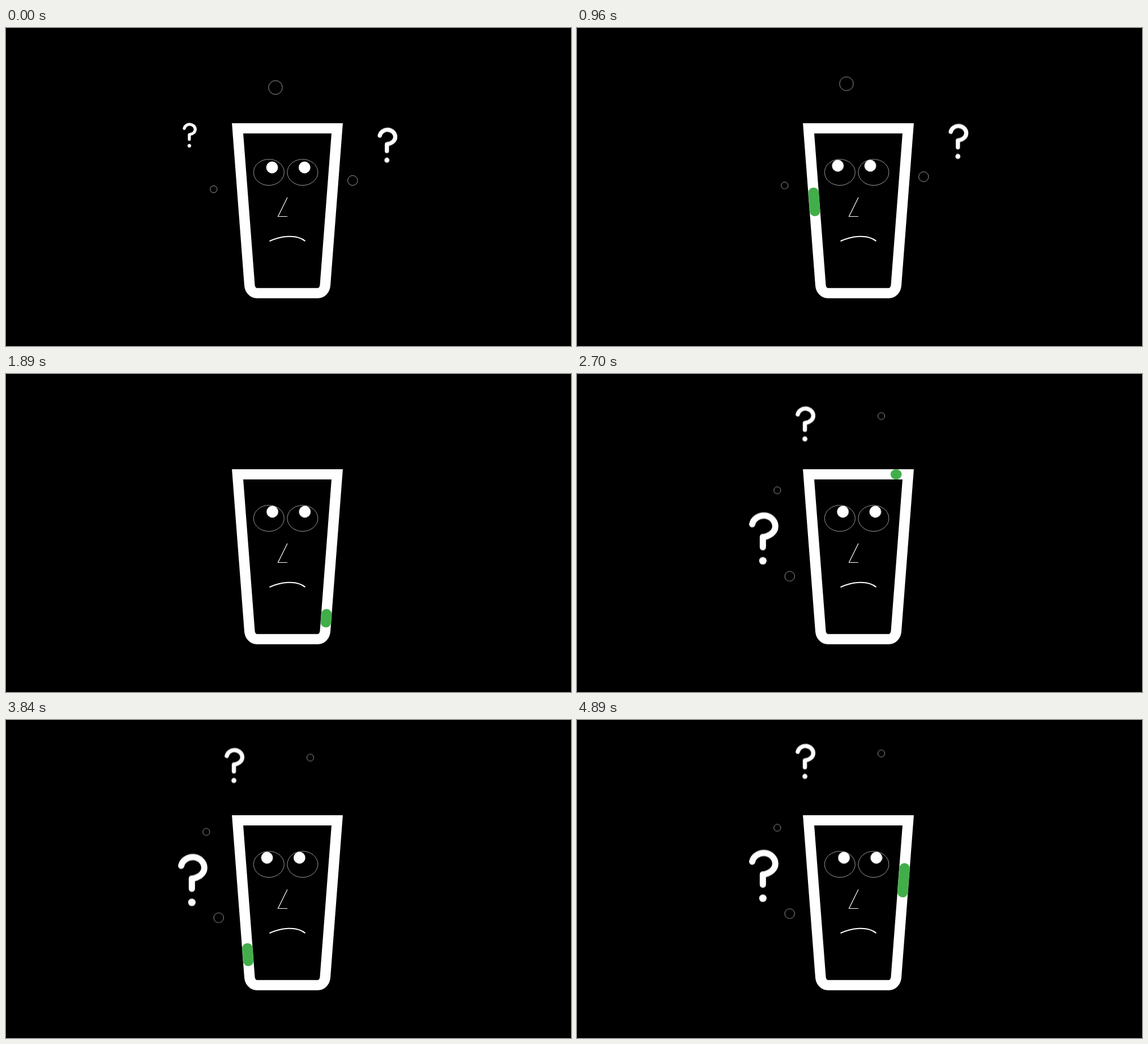
An HTML page for the animation above (4920 ms loop, 998 by 561 pixels).

```html
<!DOCTYPE html>
<html lang="en">
<head>
<meta charset="utf-8">
<title>Puzzled glass</title>
<style>
  html, body { margin: 0; width: 100%; height: 100%; overflow: hidden; background: #000; }
  svg { display: block; width: 100vw; height: 100vh; }
  svg * { animation: 4920ms linear infinite; }

  .line { fill: none; stroke: #fff; }
  .thin { stroke-width: .6; }
  .wall { fill: none; stroke-width: 18; }
  .solid { fill: #fff; }

  .pulse { stroke: #42ae49; stroke-linecap: round; stroke-linejoin: round; animation-name: pulse, wake; }
  .pupils { animation-name: look; }
  .rise { animation-name: rise; }
  .brief { animation-name: brief; }
  .early { animation-name: early; }
  .late { animation-name: late; }

  /* Head and tail run at slightly different speeds: the dash shrinks on lap one, grows on lap two. */
  @keyframes pulse {
    0% { stroke-dasharray: 0 2000; stroke-dashoffset: 0; }
    2.988% { stroke-dasharray: 55.7 2000; stroke-dashoffset: 0; }
    53.658% { stroke-dasharray: 0 2000; stroke-dashoffset: -1000; }
    53.659% { stroke-dasharray: 0 2000; stroke-dashoffset: 0; }
    100% { stroke-dasharray: 49.3 2000; stroke-dashoffset: -865; }
  }
  @keyframes wake {
    0% { opacity: 0; animation-timing-function: step-end; }
    0.6%, 100% { opacity: 1; }
  }
  @keyframes look {
    0% { transform: translate(0, 3px); }
    12.2% { transform: translate(-6.6px, 0); }
    14.63%, 68.29% { transform: translate(-8px, 0); }
    20.33%, 73.98% { transform: translate(-9.5px, 0); }
    24.39%, 78.05% { transform: translate(-9px, 0); }
    33.54%, 87.2% { transform: translate(-1.5px, 0); }
    38.41%, 92.07% { transform: translate(.5px, 0); }
    45.73%, 99.39%, 100% { transform: translate(1.5px, 0); }
    53.66% { transform: translate(.3px, 0); }
  }
  @keyframes rise { to { transform: translateY(-34px); } }
  @keyframes brief {
    0% { opacity: 1; animation-timing-function: step-end; }
    15.85%, 100% { opacity: 0; }
  }
  @keyframes early {
    0% { opacity: 1; animation-timing-function: step-end; }
    24.39%, 100% { opacity: 0; }
  }
  @keyframes late {
    0% { opacity: 0; animation-timing-function: step-end; }
    48.78%, 100% { opacity: 1; }
  }
</style>
</head>
<body>
<svg viewBox="0 0 998 561">
  <defs>
    <g id="question">
      <path d="M-18.8 20.5A20.6 19 0 0 1 22 24.3C22 34.5 12 41.5 0 43.3V61"
        class="line" stroke-width="11" stroke-linecap="round" stroke-linejoin="round"/>
      <circle cy="85" r="6.6" class="solid"/>
    </g>
  </defs>

  <!-- Both walls follow the centre line of the glass, drawn around its vertical axis -->
  <g transform="translate(497 0) scale(1.03 1)">
    <path class="wall" stroke="#fff" stroke-miterlimit="8" d="M85.4 177H-85.4L-64.8 454C-64.1 461.5 -59.2 467.7 -52.4 467.7
      H52.4C59.2 467.7 64.1 461.5 64.8 454Z"/>
    <path class="wall pulse" pathLength="1000" d="M85.4 177H-85.4L-64.8 454C-64.1 461.5 -59.2 467.7 -52.4 467.7
      H52.4C59.2 467.7 64.1 461.5 64.8 454L85.4 177"/>
  </g>

  <g class="line thin">
    <ellipse cx="464.3" cy="254.6" rx="27" ry="23"/>
    <ellipse cx="523.9" cy="254.6" rx="27" ry="23"/>
    <path d="M497 299L480.5 332.5H497" stroke-width="1.2"/>
    <path d="M465.5 376C484 367.5 513 362.5 528.5 376" stroke-width="2"/>
  </g>
  <g class="pupils solid">
    <circle cx="470" cy="243" r="10.4"/>
    <circle cx="527.3" cy="243" r="10.4"/>
  </g>

  <g class="rise">
    <use href="#question" class="brief" transform="translate(323.8 167.5) scale(.473)"/>
    <g class="early">
      <use href="#question" transform="translate(672.8 176) scale(.672)"/>
      <g class="line thin">
        <circle cx="476" cy="105" r="12.2"/>
        <circle cx="366.8" cy="284.5" r="6.1"/>
        <circle cx="612.3" cy="269" r="8.7"/>
      </g>
    </g>
    <g class="late">
      <g transform="translate(0 18.6)">
        <use href="#question" transform="translate(402.5 57.5) scale(.672)"/>
        <use href="#question" transform="translate(328.3 244.5)"/>
        <g class="line thin">
          <circle cx="537.5" cy="74.2" r="6.1"/>
          <circle cx="353.8" cy="205.2" r="6.1"/>
          <circle cx="375.7" cy="356.8" r="8.7"/>
        </g>
      </g>
    </g>
  </g>
</svg>
</body>
</html>
```
